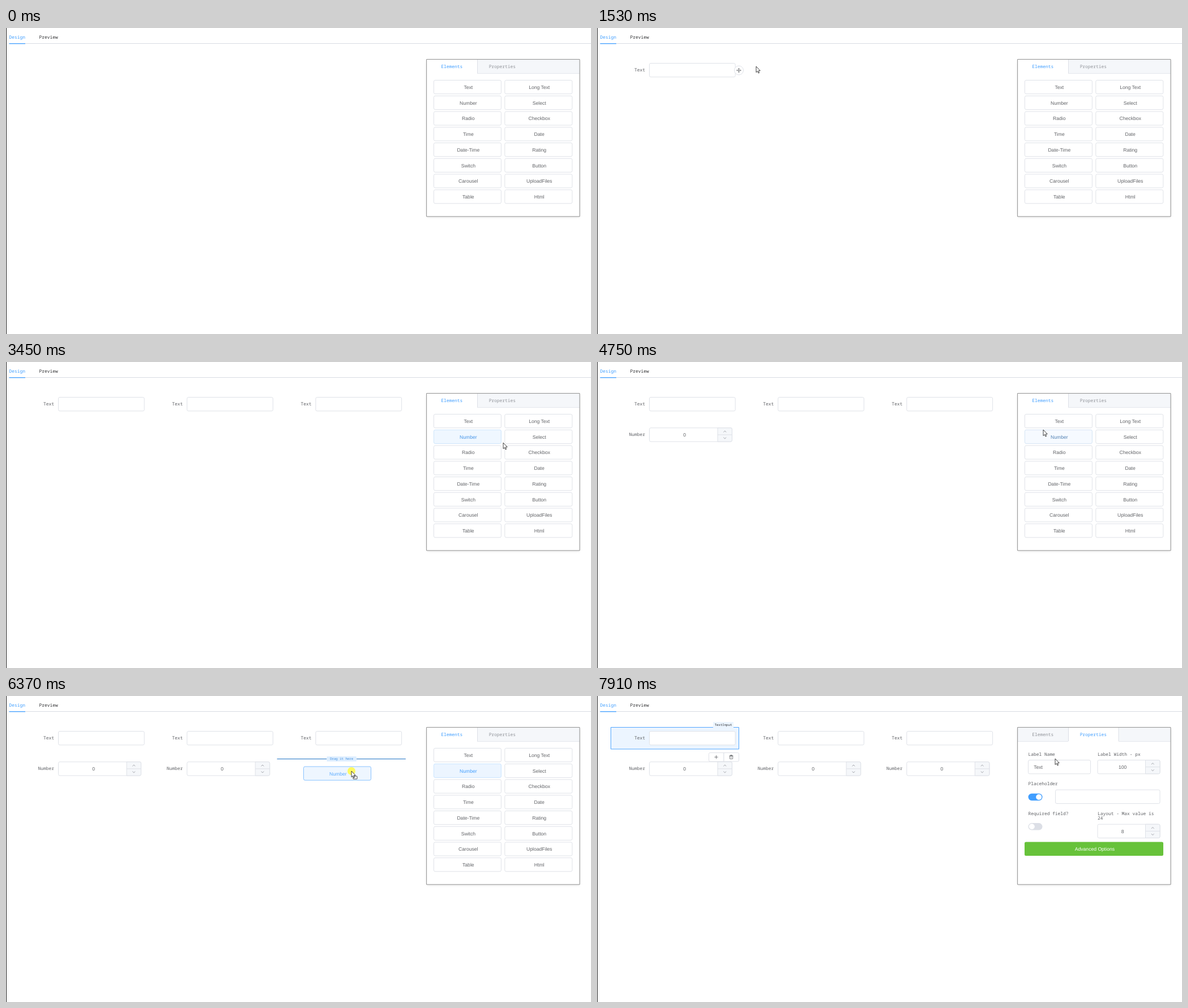
These frames come from a looping animation (1033 px wide and 542 px high, 8000 ms). An HTML page with a canvas:

```html
<!DOCTYPE html>
<html lang="en">
<head>
<meta charset="utf-8">
<title>Form designer</title>
<style>
html, body { margin: 0; width: 100%; height: 100%; overflow: hidden; background: #fff; }
canvas { display: block; width: 1033px; height: 542px; }
</style>
</head>
<body>
<canvas id="stage"></canvas>
<script>
const W = 1033, H = 542, LOOP = 8000, TICK = 76.7, LAST = 103;
const canvas = document.getElementById('stage');
const dpr = window.devicePixelRatio || 1;
canvas.width = W * dpr;
canvas.height = H * dpr;
const c = canvas.getContext('2d');
c.textRendering = 'geometricPrecision';

const SANS = '8.6px "Liberation Sans", Arial, sans-serif';
const MONO = '7.9px "Noto Sans Mono", monospace';
const TINY = '5.7px "Noto Sans Mono", monospace';
const BLUE = '#409eff', GREY = '#606266', LINE = '#dcdfe6', PALE = '#ecf5ff', SOFT = '#f5f7fa';
const COL = 227.2, ROW = 54.2;

const names = ['Text', 'Long Text', 'Number', 'Select', 'Radio', 'Checkbox', 'Time', 'Date',
  'Date-Time', 'Rating', 'Switch', 'Button', 'Carousel', 'UploadFiles', 'Table', 'Html'];
const buttons = names.map((name, i) => ({
  name, x: 755.4 + 125.4 * (i % 2), y: 92.5 + 27.73 * (i >> 1), w: 119, h: 24.2
}));

// Six elements fill a grid of three columns, each dragged from press to drop.
const presses = [14, 25, 38, 50, 65, 80], drops = [19, 32, 43, 57, 73, 85];
const SELECT = 95, PROPS = 96;
const drags = presses.map((press, i) => {
  const col = i % 3, row = Math.floor(i / 3), button = buttons[2 * row];
  return { press, drop: drops[i], col, row, button,
    from: [button.x + 84.5, button.y + 8], to: [156 + 227 * col, row ? 133 : 70] };
});

// Pointer stops (tick, x, y): free moves, then the two ends of every drag.
const stops = [
  [1, 939, 463], [4, 829, 222], [6, 829, 217], [12, ...drags[0].from],
  [20, 281, 68], [35, 815, 131], [36, 821, 117], [44, 840, 135], [45, 878, 143], [47, 878, 146],
  [62, 788, 120], [77, 988, 143], [91, 150, 60], [SELECT, 150, 60], [99, 773, 111], [LAST, 809, 111]
];
for (const d of drags) stops.push([d.press, ...d.from], [d.drop - 2, ...d.to], [d.drop, ...d.to]);
stops.sort((a, b) => a[0] - b[0]);

function pointer(k) {
  if (k < 1) return { x: -99, y: -99 };
  const i = Math.max(1, stops.findIndex(s => s[0] >= k));
  const [t0, x0, y0] = stops[i - 1], [t1, x1, y1] = stops[i];
  const f = (k - t0) / (t1 - t0);
  return { x: x0 + (x1 - x0) * f, y: y0 + (y1 - y0) * f };
}

const activeDrag = k => drags.find(d => k >= d.press && k < d.drop);
const inside = (p, x, y, w, h) => p.x >= x && p.x <= x + w && p.y >= y && p.y <= y + h;

function hovered(k) {
  const d = activeDrag(k), p = pointer(k);
  return d ? d.button : buttons.find(b => inside(p, b.x, b.y - 3.3, b.w, b.h + 3.3));
}

const overCell = k => k >= drops[0] && !activeDrag(k) && inside(pointer(k), 24, 55, COL, 39);

function mix(a, b, f) {
  const part = (s, i) => parseInt(s.slice(i, i + 2), 16);
  return `rgb(${[1, 3, 5].map(i => Math.round(part(a, i) + (part(b, i) - part(a, i)) * f))})`;
}

function text(s, x, y, color = GREY, font = MONO, align = 'left') {
  c.font = font;
  c.textAlign = align;
  c.fillStyle = color;
  c.fillText(s, x, y + (font === SANS ? 3.1 : font === MONO ? 2.5 : 1.9));
}

function rect(x, y, w, h, fill) {
  c.fillStyle = fill;
  c.fillRect(x, y, w, h);
}

function box(x, y, w, h, fill = '#fff', stroke = LINE, r = 2.5, width = 0.9) {
  c.beginPath();
  c.roundRect(x, y, w, h, r);
  if (fill) { c.fillStyle = fill; c.fill(); }
  if (stroke) { c.strokeStyle = stroke; c.lineWidth = width; c.stroke(); }
}

function disc(x, y, r, fill) {
  c.beginPath();
  c.arc(x, y, r, 0, 7);
  c.fillStyle = fill;
  c.fill();
}

function line(color, width, ...points) {
  c.beginPath();
  for (let i = 0; i < points.length; i += 2) c.lineTo(points[i], points[i + 1]);
  c.strokeStyle = color;
  c.lineWidth = width;
  c.stroke();
}

function plus(x, y, r) {
  line(GREY, 0.8, x - r, y, x + r, y);
  line(GREY, 0.8, x, y - r, x, y + r);
}

function chevron(x, y, dir) {
  line('#8d9096', 0.8, x - 2.4, y + dir, x, y - dir, x + 2.4, y + dir);
}

function button(b, x, y, level, ghost) {
  const edge = ghost ? BLUE : mix(LINE, '#c6e2ff', level);
  box(x, y, b.w, b.h, mix('#ffffff', PALE, level), edge, 2.5, ghost ? 0.7 : 0.9);
  text(b.name, x + b.w / 2 + 1.4, y + 12.4, mix(GREY, BLUE, level), SANS, 'center');
}

function stepper(x, y, w, value) {
  const right = x + w, split = right - 25.5, mid = y + 12.2;
  box(x, y, w, 24.3);
  box(split, y, 25.5, 24.3, SOFT, LINE, [0, 2.5, 2.5, 0]);
  line(LINE, 0.9, split, mid, right, mid);
  chevron(right - 12.7, y + 6.5, 1.15);
  chevron(right - 12.7, y + 18, -1.15);
  text(value, (x + split) / 2 + 1.8, y + 12.4, GREY, SANS, 'center');
}

function toggle(y, on) {
  box(761.5, y - 6.2, 25, 12.4, on ? BLUE : LINE, null, 6.2);
  disc(on ? 780.2 : 767.8, y, 5, '#fff');
}

function field({ col, row }) {
  const x = 92.5 + COL * col, y = 62.5 + ROW * row;
  text(row ? 'Number' : 'Text', x - 7.5, y + 12.2, GREY, MONO, 'right');
  if (row) stepper(x, y, 146, '0');
  else box(x, y, 151.7, 24.3);
}

function moveHandle() {
  const x = 250.5, y = 75;
  box(x - 8, y - 8, 16, 16, '#fff', LINE, 8);
  plus(x, y, 3.6);
  for (let i = 0; i < 4; i++) {
    c.save();
    c.translate(x, y);
    c.rotate(i * Math.PI / 2);
    line(GREY, 0.8, 2.4, -1.2, 3.8, 0, 2.4, 1.2);
    c.restore();
  }
}

function toolbar() {
  box(197.5, 100.5, 26.5, 15.5, '#fff', LINE, [2, 0, 0, 2]);
  box(224, 100.5, 26.5, 15.5, '#fff', LINE, [0, 2, 2, 0]);
  plus(210.5, 108.2, 3.2);
  box(235.7, 104.7, 2.7, 1.3, null, GREY, 0, 0.8);
  box(234.4, 106, 5.3, 5.4, null, GREY, 0.5, 0.8);
  line(GREY, 0.8, 233.5, 106, 240.5, 106);
  line(GREY, 0.8, 237, 107.6, 237, 110);
}

function cellFrame(k) {
  const selected = k >= SELECT;
  if (selected || overCell(k)) box(24.5, 55.5, 226, 38.5, selected ? PALE : null, BLUE, 0);
  if (selected) {
    rect(205, 46, 36, 10, PALE);
    text('TextInput', 223, 51, '#303133', TINY, 'center');
  }
}

function header() {
  rect(0, 0, 1, H, '#222');
  rect(5.5, 27, W, 1, '#d9dce2');
  rect(5.5, 27, 28.5, 1.3, BLUE);
  text('Design', 5.6, 16, BLUE);
  text('Preview', 58.6, 16, '#303133');
}

function panel(props) {
  c.save();
  c.shadowColor = 'rgba(0,0,0,.14)';
  c.shadowBlur = 5 * dpr;
  c.shadowOffsetY = dpr;
  rect(742.6, 55.5, 270.4, 278.5, '#fff');
  c.restore();
  rect(743, 56, 270, 24, SOFT);
  rect(743, 80, 270, 1, '#e4e7ed');
  rect(props ? 832 : 743, 56, 89, 25, '#fff');
  rect(832, 56, 1, 24, LINE);
  if (props) rect(920.5, 56, 1, 24, LINE);
  box(742.6, 55.6, 270.4, 278.3, null, '#858585', 0);
  text('Elements', 787.2, 68.3, props ? '#909399' : BLUE, MONO, 'center');
  text('Properties', 876.3, 68.3, props ? BLUE : '#909399', MONO, 'center');
}

function elements(k) {
  const now = hovered(k), before = hovered(k - 1);
  for (const b of buttons) {
    const level = b === now ? (b === before ? 1 : 0.5) : b === before ? 0.85 : 0;
    button(b, b.x, b.y, level);
  }
}

function properties() {
  text('Label Name', 761.5, 103);
  text('Label Width - px', 884, 103);
  box(761.5, 113.5, 110, 24.3);
  text('Text', 771.2, 126, GREY, SANS);
  stepper(884, 113.5, 110, '100');
  text('Placeholder', 761.5, 155.4);
  toggle(179, true);
  box(809.5, 166.2, 184.5, 24.3);
  text('Required field?', 761.5, 208);
  text('Layout - Max value is', 884, 208);
  text('24', 884, 216.4);
  toggle(231.3, false);
  stepper(884, 227.2, 110, '8');
  box(755, 258.5, 245, 24.5, '#67c23a', null);
  text('Advanced Options', 878.9, 271, '#fff', SANS, 'center');
}

function dropLine({ col, row }) {
  const x = 24.2 + COL * col, y = 57.3 + ROW * row;
  rect(x, y - 0.6, COL, 1.2, '#3d85cc');
  box(x + 87.5, y - 4.4, 53, 8.8, '#deeeff', null, 1.5);
  text('Drag it here', x + 114, y, '#3f8fe0', TINY, 'center');
}

function shape(x, y, points) {
  c.beginPath();
  for (let i = 0; i < points.length; i += 2) c.lineTo(x + points[i], y + points[i + 1]);
  c.closePath();
  c.fillStyle = '#fff';
  c.fill();
  c.strokeStyle = '#111';
  c.lineWidth = 0.8;
  c.lineJoin = 'round';
  c.stroke();
}

const arrow = [0, 0, 0, 10.6, 2.4, 8.4, 4, 12, 5.6, 11.3, 4.1, 7.8, 7.2, 7.6];
const hand = [-1, 0.5, 1, 0.5, 1, 4.6, 5.5, 5.6, 6, 9, 5, 12.8, -0.8, 12.8, -4.2, 7.2, -1, 8.2];

function drawPointer(k, p, dragging) {
  const q = pointer(k - 1);
  const slow = Math.hypot(p.x - q.x, p.y - q.y) < 20;
  if (dragging) box(p.x + 3, p.y + 9, 7, 5, '#fff', '#333', 0.5);
  const pointing = !dragging && k < PROPS && slow && hovered(k - 1);
  shape(p.x, p.y, pointing ? hand : arrow);
}

function draw(k) {
  const p = pointer(k), d = activeDrag(k), props = k >= PROPS;
  c.setTransform(dpr, 0, 0, dpr, 0, 0);
  rect(0, 0, W, H, '#fff');
  header();
  cellFrame(k);
  drags.filter(f => k >= f.drop).forEach(field);
  if (k >= SELECT) toolbar();
  else if (overCell(k) || overCell(k - 1)) moveHandle();
  panel(props);
  if (props) properties();
  else elements(k);
  if (d && k > d.press) {
    if (p.x < 730) dropLine(d);
    c.globalAlpha = 0.85;
    button(d.button, d.button.x + p.x - d.from[0], d.button.y + p.y - d.from[1], 1, true);
    c.globalAlpha = 1;
  }
  if (d || (k >= SELECT - 2 && k < SELECT)) disc(p.x, p.y, 7, 'rgba(255,250,60,.8)');
  if (k > 0) drawPointer(k, p, d);
}

function frame(now) {
  draw(Math.min(LAST, Math.floor((now % LOOP + 12) / TICK)));
  requestAnimationFrame(frame);
}
requestAnimationFrame(frame);
</script>
</body>
</html>
```
